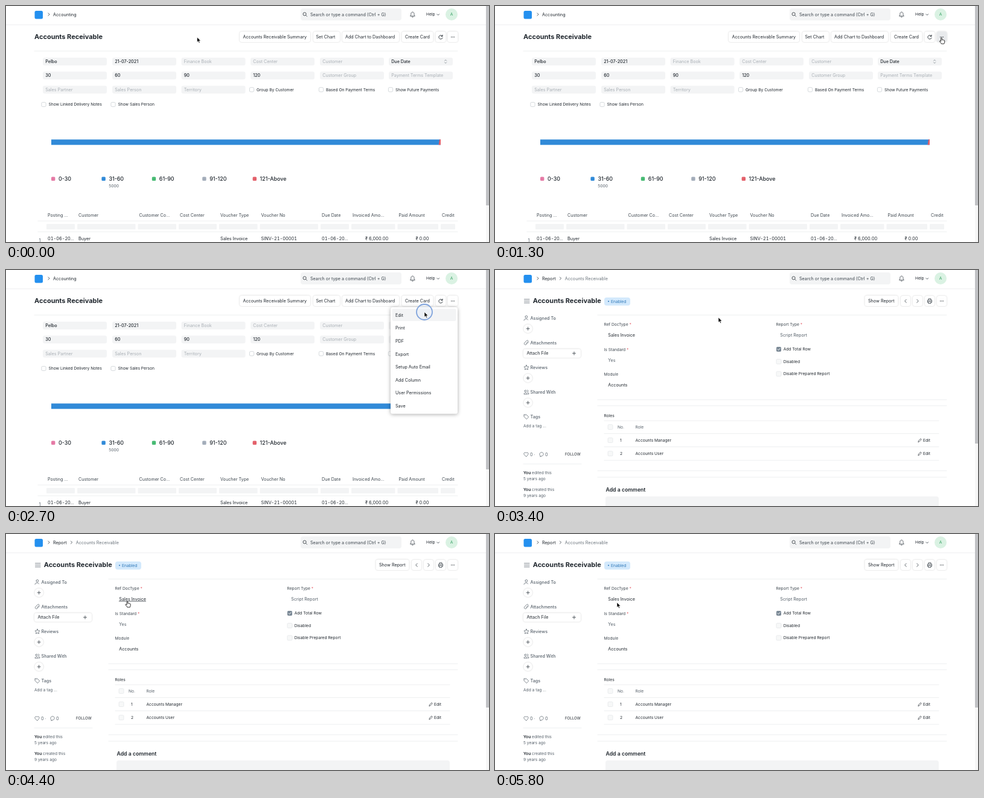
These frames come from a looping animation (800x393 px, 5.9 s). An HTML page:

```html
<!DOCTYPE html>
<html lang="en">
<head>
<meta charset="utf-8">
<title>Accounts Receivable</title>
<style>
html, body { margin: 0; width: 100%; height: 100%; overflow: hidden; background: #fff; }
svg { display: block; width: 100vw; height: 100vh; font-family: Inter, "Noto Sans", sans-serif; }
.btn { fill: #fff; filter: drop-shadow(0 .6px .8px #0003); }
.menu { fill: #fff; filter: drop-shadow(0 1.5px 3px #0005); }
.num { font-variant-numeric: tabular-nums; }
</style>
</head>
<body>
<svg id="stage" viewBox="0 0 800 393"></svg>
<script>
const DARK = '#20272e', GREY = '#56606a', PALE = '#a9afb5', FIELD = '#f3f4f5', RULE = '#e9ebed';
const BODY = 7.2, SMALL = 6.67;

// Text is placed by its left edge and the middle of its capitals.
const text = (x, y, s, { size = BODY, weight = 400, fill = DARK, more = '' } = {}) =>
  `<text x="${x}" y="${y + size * .36}" font-size="${size}" font-weight="${weight}" fill="${fill}" ${more}>${s}</text>`;
const small = (x, y, s, fill = DARK, weight = 400) => text(x, y, s, { size: SMALL, fill, weight });
const rect = (x, y, w, h, fill, r = 0, more = '') =>
  `<rect x="${x}" y="${y}" width="${w}" height="${h}" rx="${r}" fill="${fill}" ${more}/>`;
const line = (d, color = '#333b43', width = .8) =>
  `<path d="${d}" fill="none" stroke="${color}" stroke-width="${width}" stroke-linecap="round" stroke-linejoin="round"/>`;
const rule = (x1, x2, y) => line(`M${x1} ${y}H${x2}`, RULE, .8);
const circle = (x, y, r, fill, more = '') => `<circle cx="${x}" cy="${y}" r="${r}" fill="${fill}" ${more}/>`;
const button = (x, y, w, h) => rect(x, y, w, h, '#fff', 3.5, 'class="btn"');
const box = (x, y) => rect(x + .4, y - 3.6, 7.2, 7.2, '#fff', 1.8, 'stroke="#c4cacf" stroke-width=".7"');
const check = (x, y, s) => box(x, y) + small(x + 12, y, s);
const chevron = (x, y, dir = 1, size = 2.2) =>
  line(`M${x - dir * size / 2} ${y - size}l${dir * size} ${size}l${-dir * size} ${size}`);
const plus = (x, y) => line(`M${x - 2.6} ${y}h5.2m-2.6 -2.6v5.2`);
const dots = (x, y) => [-2.3, 0, 2.3].map(d => circle(x + d, y, .65, DARK)).join('');
const group = (id, ...parts) => `<g id="${id}">${parts.join('')}</g>`;
const each = (list, draw) => list.map(draw).join('');

function navbar() {
  return rect(47.5, 8, 13.5, 13.5, '#2490ef', 2.5) + chevron(71, 14) +
    rect(488, 4, 167, 20, FIELD, 4) +
    circle(494.6, 13.4, 2.6, 'none', `stroke="${DARK}" stroke-width=".8"`) + line('M496.6 15.4l2 2') +
    text(504, 14, 'Search or type a command (Ctrl + G)', { fill: '#39424a' }) +
    line('M669.8 16.6c1.3-1 .9-2.7 1.1-4.2c.5-3.1 4.5-3.1 5 0c.2 1.5-.2 3.2 1.1 4.2zM672.2 18.2q1.2 1 2.4 0') +
    small(696, 14, 'Help') + line('M713.8 13.4l1.9 1.9l1.9-1.9') +
    circle(738, 14, 10, '#daf2e3') + small(735.8, 14, 'A', '#36a064') +
    rule(0, 795, 31.3);
}

function report() {
  const cols = [61, 176, 290.5, 405, 520, 634];
  const fields = [
    ['Pelbo', '21-07-2021', 'Finance Book', 'Cost Center', 'Customer', 'Due Date'],
    ['30', '60', '90', '120', 'Customer Group', 'Payment Terms Template'],
    ['Sales Partner', 'Sales Person', 'Territory'],
  ];
  const filled = /^(\d|Pelbo|Due)/;
  const filters = each(fields, (row, r) => each(row, (s, c) => {
    const y = 92.5 + 23.4 * r;
    return rect(cols[c], y - 6.6, 106, 13, FIELD, 3) +
      text(cols[c] + 4.2, y, s, { fill: filled.test(s) ? DARK : PALE, weight: filled.test(s) ? 450 : 400 });
  }));
  const legend = [['0-30', '#e57ba6'], ['31-60', '#318ad8'], ['61-90', '#48bb74'],
    ['91-120', '#a3adba'], ['121-Above', '#e3616b']];
  const heads = [[69, 'Posting ...'], [120, 'Customer'], [220.5, 'Customer Co...'], [288, 'Cost Center'],
    [355, 'Voucher Type'], [422.5, 'Voucher No'], [523, 'Due Date'], [574, 'Invoiced Amo...'],
    [650.5, 'Paid Amount'], [722, 'Credit']];
  const cells = [[69, '01-06-20...'], [120, 'Buyer'], [355, 'Sales Invoice'], [422.5, 'SINV-21-00001'],
    [523, '01-06-20...'], [595, '₹ 6,000.00'], [678.5, '₹ 0.00']];
  const buttons = [[387, 117, 392.5, 'Accounts Receivable Summary'], [509, 44, 513.5, 'Set Chart'],
    [557, 94, 562, 'Add Chart to Dashboard'], [655.5, 52, 661, 'Create Card']];

  return group('report',
    text(78, 14, 'Accounting'),
    text(47, 51.3, 'Accounts Receivable', { size: 11, weight: 700 }),
    each(buttons, ([x, w, tx, s]) => button(x, 42.5, w, 17.5) + text(tx, 51.5, s)),
    button(711.5, 42.5, 17, 17.5), button(731.5, 42.5, 17, 17.5),
    group('dotsHover', rect(731.5, 42.5, 17, 17.5, '#e8eaec', 3.5)), dots(740, 51.7),
    line('M722.8 50.2a3.2 3.2 0 1 0 .3 2.8M723 48.2v2.2h-2.2', DARK, .9),
    rule(47, 748, 75), filters,
    line('M726.6 91.2l1.5-1.6l1.5 1.6M726.6 93.8l1.5 1.6l1.5-1.6', '#6b747c', .7),
    check(403, 139.3, 'Group By Customer'), check(518, 139.3, 'Based On Payment Terms'),
    check(633, 139.3, 'Show Future Payments'),
    check(58.5, 164, 'Show Linked Delivery Notes'), check(173.5, 164, 'Show Sales Person'),
    rect(75, 222.3, 645, 9, '#318ad8'),
    '<path d="M718 222.3h2v9h-3.5z" fill="#e3616b"/>',
    each(legend, ([s, color], i) => rect(75 + 83.4 * i, 284.6, 6.4, 6.4, color, 1.5) +
      text(87 + 83.4 * i, 287.6, s, { size: 8.9, weight: 500 })),
    small(170.3, 299.3, '5000', GREY),
    rule(53, 748, 358),
    each(heads, ([x, s], i) => text(x, 348.7, s, { fill: '#3c454d' }) +
      rect(x - 2, 363, (heads[i + 1]?.[0] ?? 750) - x - 4, 9, FIELD, 1)),
    rule(53, 748, 376),
    text(54.5, 390, '1', { fill: GREY }),
    each(cells, ([x, s]) => text(x, 387.3, s, { size: 7.3, more: 'class="num"' })),
    group('menu', rect(637, 62, 111, 177.5, '#fff', 3.5, 'class="menu"'),
      group('editHover', rect(639.5, 64.5, 106, 20.5, '#f3f4f5', 3)),
      each(['Edit', 'Print', 'PDF', 'Export', 'Setup Auto Email', 'Add Column', 'User Permissions', 'Save'],
        (s, i) => text(645, 75 + 21.65 * i, s))));
}

function sidebar() {
  const icon = d => line(d, GREY, .75);
  const labels = [[80.3, 'Assigned To'], [121.3, 'Attachments'], [162.3, 'Reviews'], [203.5, 'Shared With'], [244.5, 'Tags']];
  return each(labels, ([y, s]) => text(58.5, y, s, { fill: GREY, weight: 500 })) +
    icon('M50 78a1.9 1.9 0 1 0 3.8 0a1.9 1.9 0 1 0 -3.8 0M48 84c0-3.5 6-3.5 6.5-1') +
    icon('M55.5 120l-3.6 3.9c-2 2-4.9-.7-2.9-2.8l3.5-3.6c1.4-1.3 3.2.5 2 1.8l-3.2 3.3') +
    icon('M52 158.3l1.2 2.5l2.8.4l-2 2l.5 2.8l-2.5-1.3l-2.5 1.3l.5-2.8l-2-2l2.8-.4z') +
    icon('M49 201.5a1.5 1.5 0 1 0 3 0a1.5 1.5 0 1 0-3 0M48 206.5c0-3 5-3 5 0zM53.5 200c2 0 2 3 0 3M54 204c1.5 0 2 1 2 2.5h-2') +
    icon('M48.3 240.8h3.5l4 4l-3.6 3.6l-3.9-3.9zM50 242.6h.1') +
    each([97.7, 180, 221], y => circle(54.6, y, 7.2, '#fff', 'class="btn"') + plus(54.6, y)) +
    button(47, 131.5, 95, 14.5) + text(52.5, 138.8, 'Attach File') + plus(131, 138.8) +
    small(47, 259.7, 'Add a tag ...', GREY) +
    icon('M51.5 310.7l-3.2-3.3c-1.7-2.1 1.4-5 3.2-2.6c1.8-2.4 4.9.5 3.2 2.6z') +
    text(58, 307.2, '0 ·', { fill: GREY }) +
    icon('M75 309.6c-2.5-2.6-.8-6 2.3-6s4.6 5-.2 6.4l-2 .8z') +
    text(83, 307.2, '0', { fill: GREY }) + text(116, 307.2, 'FOLLOW', { size: 6.1 }) +
    rule(47, 143, 323) +
    each([[337.7, 'edited', 5], [366, 'created', 9]], ([y, verb, n]) =>
      small(47, y, `<tspan font-weight="600" fill="${DARK}">You</tspan> ${verb} this`, GREY) +
      small(47, y + 10, `${n} years ago`, GREY));
}

function form() {
  const star = '<tspan fill="#e5606a"> *</tspan>';
  const field = (x, y, label, value, fill = DARK) =>
    small(x, y, label, '#3f4850') + text(x + 6.8, y + 17.7, value, { fill });
  const faint = (x, y) => rect(x, y - 4, 8, 8, '#f7f8f8', 1.5, 'stroke="#dde1e4" stroke-width=".6"');
  const row = (y, n, s) => faint(187, y) + small(207, y, n) + small(232.5, y, s) +
    line(`M701 ${y + 2.8}l.5-2l3.4-3.5l1.4 1.4l-3.4 3.5z`, DARK, .7) + small(709, y + .3, 'Edit');

  return group('form',
    text(78, 14, 'Report'), chevron(108.5, 14), text(115.7, 14, 'Accounts Receivable', { fill: '#6b747c' }),
    line('M48.5 48.8h8.5M48.5 51.8h8.5M48.5 54.8h8.5', GREY, .8),
    text(62.7, 51.3, 'Accounts Receivable', { size: 11, weight: 700 }),
    rect(181, 45.8, 43, 13.4, '#d3e9fc', 4), circle(188, 52.3, 1, '#2d77b8'), small(192, 52.3, 'Enabled', '#2d77b8'),
    button(612.5, 42.5, 55, 17.5), text(618, 51.5, 'Show Report'),
    each([672, 692, 712, 732], x => button(x, 43, 16, 17)),
    chevron(680, 51.7, -1, 2.6), chevron(700, 51.7, 1, 2.6),
    line('M718 50v-2.2h4v2.2M717.6 53.7h-1.1v-3.5h7v3.5h-1.1M718 52.5h4v3h-4z'), dots(740, 51.7),
    sidebar(),
    rule(170, 748, 75),
    field(180.5, 90.5, 'Ref DocType' + star, 'Sales Invoice'),
    group('underline', line('M187.3 112.1H231.5', DARK, .7)),
    field(180.5, 132.3, 'Is Standard' + star, 'Yes', GREY),
    field(180.5, 174, 'Module', 'Accounts'),
    field(465.5, 90.5, 'Report Type' + star, 'Script Report', GREY),
    rect(466, 128, 8, 8, '#7b8996', 1.8), line('M468 132l1.5 1.6l2.6-3', '#fff', .9),
    faint(466, 152.5), faint(466, 173),
    small(477.7, 132, 'Add Total Row'), small(477.7, 152.5, 'Disabled'), small(477.7, 173, 'Disable Prepared Report'),
    each([216, 226, 334.3, 345], y => rule(170, 748, y)),
    small(180.5, 242.3, 'Roles'),
    each([251, 272.5, 294.5, 317], y => rule(181, 735, y)),
    faint(187, 261.5), small(203, 261.5, 'No.', GREY), small(232.5, 261.5, 'Role', GREY),
    row(283.5, '1', 'Accounts Manager'), row(305.7, '2', 'Accounts User'),
    text(183.5, 366, 'Add a comment', { size: 8.7, weight: 600 }),
    rect(183, 377, 552, 30, FIELD, 4));
}

const scrollbar = rect(795, 0, 5, 393, '#f7f7f7') + '<rect id="thumb" x="795" width="5" fill="#c1c2c5"/>';
const pointer = group('cursor',
  group('ring', circle(0, 0, 13, '#dfe9f855', 'stroke="#7fa3dc" stroke-width="1.8"')),
  group('arrow', '<path d="M0 0v8.2l1.9-1.7l1.3 3l1.4-.6l-1.3-2.9h2.6z" fill="#000" stroke="#fff" stroke-width=".6"/>'),
  group('hand', '<path d="M-.9.9c0-1.3 1.7-1.3 1.7 0v2.7c.3-.8 1.5-.6 1.5.2c.4-.6 1.4-.4 1.5.4c.5-.5 1.4-.1 1.4.7v2.2c0 1.2-.9 1.6-.9 2.9h-4.400c-.2-1.400-2.200-2.500-2.900-4c-.4-1 .8-1.500 1.400-.7l.7.8z" fill="#fff" stroke="#000" stroke-width=".8"/>'));

const $ = id => document.getElementById(id);
$('stage').innerHTML = navbar() + report() + form() + scrollbar + pointer;

const LOOP = 5900, TICK = 100;
const path = [[300, 316.5, 52], [1100, 739.5, 53], [1500, 739.5, 53], [1900, 697, 68],
  [2500, 693, 70], [3000, 693, 70], [3400, 370, 79], [4200, 201, 112], [4900, 201, 112], [5000, 202, 114]];

function position(t) {
  const i = path.findIndex(k => k[0] > t);
  if (i < 1) return path.at(i).slice(1);
  const [t0, x0, y0] = path[i - 1], [t1, x1, y1] = path[i];
  const u = (t - t0) / (t1 - t0), e = u * u * (3 - 2 * u);
  return [x0 + (x1 - x0) * e, y0 + (y1 - y0) * e];
}

const show = (id, on) => $(id).setAttribute('display', on ? 'inline' : 'none');
const within = (t, a, b) => t >= a && t < b;

function draw(now) {
  const t = Math.floor(now % LOOP / TICK) * TICK;
  const onForm = t >= 3000, onLink = within(t, 4100, 5000);
  show('report', !onForm);
  show('form', onForm);
  show('menu', within(t, 1500, 3000));
  show('dotsHover', within(t, 1100, 1600));
  show('editHover', t >= 2000);
  show('underline', onLink);
  show('ring', within(t, 1400, 1600) || within(t, 2600, 2900));
  const hand = within(t, 1100, 2500) || onLink;
  show('hand', hand);
  show('arrow', !hand);
  $('thumb').setAttribute('height', onForm ? 289 : 332);
  $('cursor').setAttribute('transform', `translate(${position(t)})`);
  requestAnimationFrame(draw);
}
requestAnimationFrame(draw);
</script>
</body>
</html>
```
